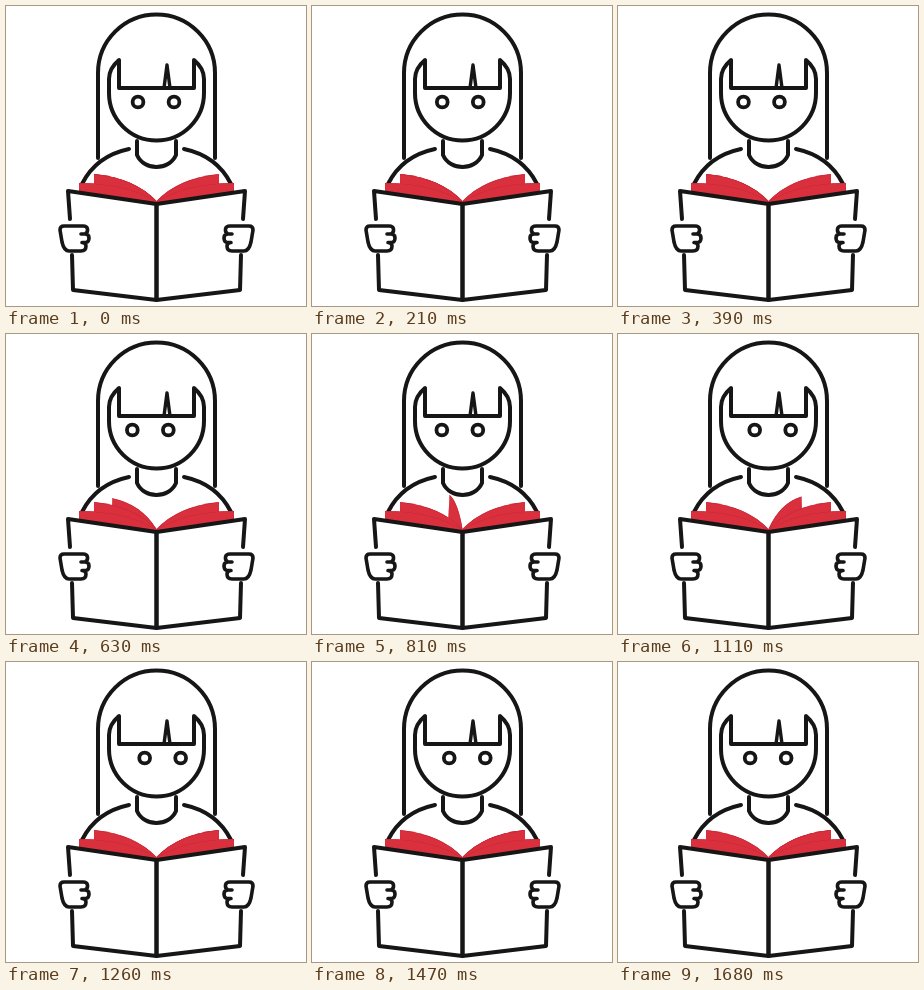
An HTML page with a canvas that plays this animation: 300x300 px, repeating every 1.83 s.

```html
<!DOCTYPE html>
<html lang="en">
<head>
<meta charset="utf-8">
<title>Reading girl</title>
<style>
  html, body { margin: 0; width: 100%; height: 100%; overflow: hidden; background: #fff; }
  canvas { display: block; width: 300px; height: 300px; }
</style>
</head>
<body>
<canvas id="stage" width="300" height="300"></canvas>
<script>
const ctx = document.getElementById('stage').getContext('2d');
const LOOP = 1830, STEP = 30, MID = 900;
const INK = '#161616', RED = '#da2f3d', CREASE = '#c32936';
const AXIS = 150.5;

const clamp = (v, lo, hi) => Math.min(hi, Math.max(lo, v));
const sineEase = u => (1 - Math.cos(Math.PI * clamp(u, 0, 1))) / 2;

// Glance left, sweep right, then return to the centre.
function eyeShift(t) {
  return -7 * sineEase((t - 90) / 360)
       + 14 * sineEase((t - 450) / 900)
       - 7 * sineEase((t - 1350) / 360);
}

// Position of the turning page: -1 lies left, 1 lies right.
function pageTurn(t) {
  const u = clamp((t - MID) / 360, -1, 1);
  return 0.77 * u + 0.23 * u * Math.abs(u);
}

function line(d, width = 4) {
  ctx.strokeStyle = INK;
  ctx.lineWidth = width;
  ctx.stroke(new Path2D(d));
}

function mirrored(draw) {
  draw();
  ctx.save();
  ctx.translate(2 * AXIS, 0);
  ctx.scale(-1, 1);
  draw();
  ctx.restore();
}

function redSheet(d) {
  const shape = new Path2D(d);
  ctx.fillStyle = RED;
  ctx.fill(shape);
  ctx.save();
  ctx.clip(shape);
  ctx.strokeStyle = CREASE;
  ctx.lineWidth = 1;
  ctx.stroke(shape);
  ctx.restore();
}

function page(turn) {
  const dx = 62.5 * turn, lift = turn * turn;
  const x = AXIS + dx, y = 160.5 + 7.5 * lift;
  redSheet(`M${x} ${y} Q${AXIS + 0.35 * dx} ${168 + 4 * lift} ${AXIS} 195
    V198 L${x + 1.5 * Math.sign(dx) * (1 - lift)} 190Z`);
}

function girl(shift) {
  line('M92 152V67A58.5 58.5 0 0 1 209 67V152');
  line(`M113 54V82H188V54C194 59 198 65 198 73V87
    A47.5 47.5 0 0 1 103 87V73C103 65 107 59 113 54Z`);
  line('M158 82L161 59L164 82', 3.4);
  line('M131 135V149C138 165 163 165 170 149V135');
  mirrored(() => line('M123 143Q90 150 76 178'));
  ctx.lineWidth = 3.8;
  for (const x of [132, 168]) {
    ctx.beginPath();
    ctx.arc(x + shift, 96, 5.4, 0, Math.PI * 2);
    ctx.stroke();
  }
}

function book(turn) {
  page(turn);
  mirrored(() => {
    page(-1);
    redSheet('M73 177Q122 177 150.5 196V200L73 188Z');
  });
  ctx.fillStyle = '#fff';
  ctx.fill(new Path2D('M62 185L150.5 198L239 185L234 284L150.5 294L67 284Z'));
  mirrored(() => {
    line('M64 213L62 185L150.5 198V294L67 284L66 249');
    line(`M75 228H79Q82 227 81.500 223Q81 220 77 220H58Q54 220 54 224
      L56 236Q58 245 63 245H75Q80 245 80 240Q80 237 76 236.500
      H80Q83 236 83 232Q83 228 79 228`, 3.6);
  });
}

function frame(now) {
  const t = Math.floor((now % LOOP) / STEP) * STEP;
  ctx.fillStyle = '#fff';
  ctx.fillRect(0, 0, 300, 300);
  ctx.lineCap = ctx.lineJoin = 'round';
  girl(eyeShift(t));
  book(pageTurn(t));
}

const start = performance.now();
function tick() {
  frame(performance.now() - start);
  requestAnimationFrame(tick);
}
tick();
</script>
</body>
</html>
```
